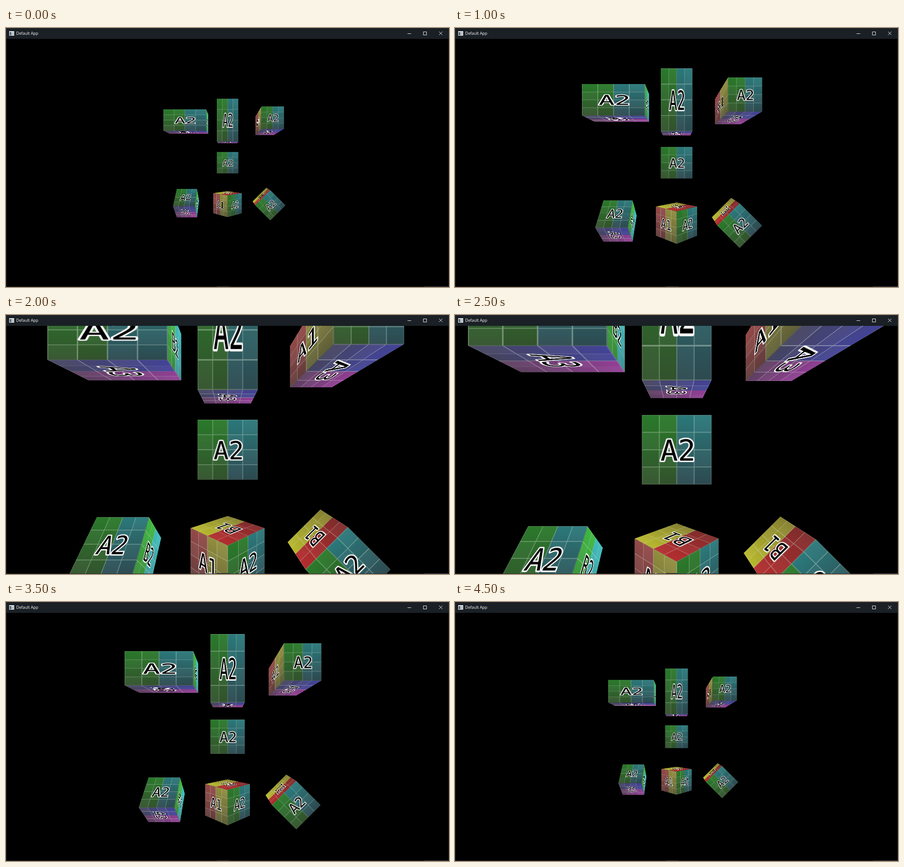
Recreate the animation shown at these times as an HTML page. Size 977x573 px, loop 4750 ms.

```html
<!DOCTYPE html>
<html lang="en">
<head>
<meta charset="utf-8">
<title>Default App</title>
<style>
html, body { margin: 0; width: 100%; height: 100%; overflow: hidden; background: #000; }
#window { position: absolute; left: 0; top: 0; width: 977px; height: 573px; }
#view { position: absolute; left: 0; top: 24px; width: 977px; height: 548px; overflow: hidden; perspective: 448px; }
#world, .cube { position: absolute; left: 50%; top: 50%; transform-style: preserve-3d; }
.cube { left: 0; top: 0; }
.face { position: absolute; left: -80px; top: -80px; width: 160px; height: 160px; backface-visibility: hidden; }
.face svg { display: block; }
.face text { stroke: #fff; stroke-width: 4; stroke-linejoin: round; paint-order: stroke; }
</style>
</head>
<body>
<div id="view"><div id="world"></div></div>
<svg id="window" viewBox="0 0 977 573">
  <path d="M0 0h977v24h-977z" fill="#1a2025"/>
  <path d="M.5 .5h976v572h-976zM465 571.5h28M922 571.5h54" fill="none" stroke="#2a2d30"/>
  <path d="M7 7h11v10h-11z" fill="#e4e8ea"/>
  <path d="M8 9h4v7h-4z" fill="#59666e"/>
  <path d="M13 9h4v7h-4z" fill="#b4bdc2"/>
  <text x="22.5" y="15" font-family="Open Sans, sans-serif" font-size="8.8" fill="#fff">Default App</text>
  <path d="M885.5 12.5h8M920.5 8.5h7v7h-7zM955 8l7.5 7.5M962.5 8l-7.5 7.5" fill="none" stroke="#f0f0f0"/>
</svg>
<script>
const UNIT = 160, PERSPECTIVE = 448;
const FONT = '42px DejaVu Sans Mono, monospace';

// label, orientation, then top and bottom colour of the left and right halves
const faces = [
  ['A2', '', '#2a7a2b', '#33522d', '#2b797b', '#2d4a50'],
  ['A1', 'rotateY(-90deg)', '#944a48', '#633c3c', '#928e3e', '#5f5f38'],
  ['B2', 'rotateY(90deg)', '#3fb842', '#3a8a3a', '#40bcbc', '#3f9496'],
  ['A3', 'rotateX(-90deg) rotateZ(90deg)', '#434398', '#45445f', '#923f95', '#5d4060'],
  ['B1', 'rotateX(90deg) rotateZ(-90deg)', '#b42d2e', '#7f2c2c', '#b8b82e', '#858030'],
];

// position in units, then scale or rotation
const cubes = [
  [0, 0, ''],
  [-2, 2, 'scaleX(2)'], [0, 2, 'scaleY(2)'], [2, 2, 'scaleZ(2)'],
  [-2, -2, 'rotateX(45deg)'], [0, -2, 'rotateY(45deg)'], [2, -2, 'rotateZ(-45deg)'],
];

let checker = '', grid = '';
for (let row = 0; row < 4; row++)
  for (let col = (row + 1) % 2; col < 4; col += 2)
    checker += `M${col * 25} ${row * 25}h25v25h-25z`;
for (let p = 0; p <= 100; p += 25) grid += `M0 ${p}h100M${p} 0v100`;

const half = (side, top, bottom) => `linear-gradient(${top}, ${bottom}) ${side} 0 / 50% 100% no-repeat`;

// Centres the visible ink of a label, not its advance box.
const pen = document.createElement('canvas').getContext('2d');
pen.font = FONT;
function labelHTML(label) {
  const m = pen.measureText(label);
  const x = 50 + (m.actualBoundingBoxLeft - m.actualBoundingBoxRight) / 2;
  const y = 50 + (m.actualBoundingBoxAscent - m.actualBoundingBoxDescent) / 2;
  return `<text x="${x}" y="${y}" style="font:${FONT}">${label}</text>`;
}

const faceHTML = ([label, turn, a, b, c, d]) => `
  <div class="face" style="transform:${turn} translateZ(${UNIT / 2}px);
      background:${half('0', a, b)}, ${half('100%', c, d)}">
    <svg width="${UNIT}" height="${UNIT}" viewBox="0 0 100 100">
      <path d="${checker}" fill="#fff" opacity=".035"/>
      <path d="${grid}" stroke="#dfeee0" stroke-width="1" opacity=".42"/>
      ${labelHTML(label)}
    </svg>
  </div>`;

const world = document.getElementById('world');
world.innerHTML = cubes.map(([x, y, shape]) => `
  <div class="cube" style="transform:translate(${x * UNIT}px, ${-y * UNIT}px) ${shape}">
    ${faces.map(faceHTML).join('')}
  </div>`).join('');

// The camera moves in at a steady rate and back out, in quarter-second steps.
function draw(now) {
  const t = Math.floor(now % 4750 / 250) / 4;
  const distance = Math.max(10 - 3.06 * t, 3 * t - 4.08);
  world.style.transform = `translateZ(${PERSPECTIVE - distance * UNIT}px)`;
  requestAnimationFrame(draw);
}
draw(0);
</script>
</body>
</html>
```
